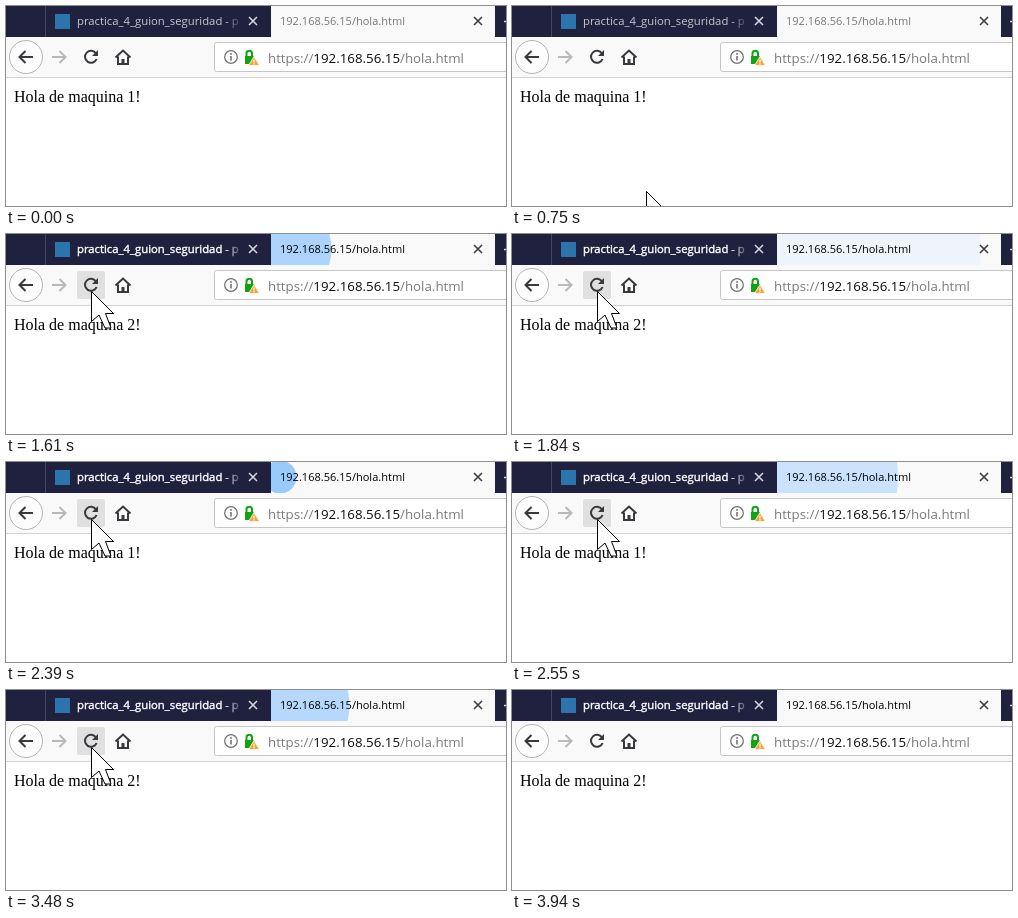
These frames come from a looping animation (500x200 px, 4800 ms). An HTML page:

```html
<!DOCTYPE html>
<html lang="es">
<head>
<meta charset="utf-8">
<title>Recarga de página</title>
<style>
  html, body { margin: 0; width: 100%; height: 100%; overflow: hidden; background: #fff; }
  svg { display: block; width: 500px; height: 200px; }
  text { font-family: "Open Sans", "Noto Sans", sans-serif; white-space: pre; }
  .page { font: 16px "Liberation Serif", "Times New Roman", serif; }
  .icon { fill: none; stroke: #38383d; stroke-width: 2; }
</style>
</head>
<body>
<svg viewBox="0 0 500 200">
  <defs>
    <linearGradient id="fade">
      <stop offset="0" stop-color="#20213f" stop-opacity="0"/>
      <stop offset="1" stop-color="#20213f"/>
    </linearGradient>
    <clipPath id="tab"><path d="M265 0H489V31H265Z"/></clipPath>
  </defs>

  <!-- Tab strip -->
  <path fill="#20213f" d="M0 0H500V31H0Z"/>
  <path stroke="#45465f" d="M39.5 0V31"/>
  <path fill="#2c74ac" d="M49 8H64V23H49Z"/>
  <text id="otherTitle" x="71" y="19" font-size="11.3" fill="#fff" stroke="#fff">practica_4_guion_seguridad - p</text>
  <path fill="url(#fade)" d="M218 0H238V31H218Z"/>
  <path fill="#20213f" d="M238 0H265V31H238Z"/>
  <path stroke="#d6d6de" stroke-width="1.6" d="M243 11L251 19M251 11L243 19M498 15.5H500"/>
  <path fill="#f9f9fa" d="M265 0H489V31H265Z"/>
  <g clip-path="url(#tab)"><circle id="burst" cx="274" cy="15" fill="#0a84ff"/></g>
  <text id="title" x="274" y="19" font-size="11.04">192.168.56.15/hola.html</text>
  <path stroke="#3c3c40" stroke-width="1.6" d="M468 11L476 19M476 11L468 19"/>

  <!-- Toolbar -->
  <path fill="#f9f9fa" d="M0 31H500V71H0Z"/>
  <path stroke="#d2d2d4" d="M0 71.5H500"/>
  <rect id="button" x="71" y="37" width="28" height="28" rx="2" fill="#0c0c0d"/>
  <circle cx="20" cy="51" r="16.5" fill="#fdfdfd" stroke="#b4b4b6"/>
  <path class="icon" d="M27 51H14M19.5 45L13.5 51L19.5 57"/>
  <path class="icon" style="stroke:#b9b9bb" d="M46 51H59M53.5 45L59.5 51L53.5 57"/>
  <path class="icon" d="M90 47.5A6 6 0 1 0 90.6 53"/>
  <path fill="#38383d" d="M92 44V50H86Z"/>
  <path class="icon" d="M109.5 51.5L117 44.5L124.5 51.5M112 50.5V58H122V50.5"/>
  <path fill="#38383d" d="M115.5 53H118.5V58H115.5Z"/>

  <!-- Address bar -->
  <rect x="208.5" y="36.5" width="310" height="29" rx="2" fill="#fff" stroke="#c6c6c8"/>
  <circle cx="225" cy="51" r="6.3" fill="none" stroke="#737376" stroke-width="1.3"/>
  <path stroke="#737376" stroke-width="1.6" d="M225 50V54.5M225 47V48.7"/>
  <path fill="none" stroke="#12a312" stroke-width="2" d="M240.5 51V47.5A2.7 2.7 0 0 1 246 47.5V51"/>
  <path fill="#12a312" d="M239 50H248V58H239Z"/>
  <path fill="#f9a53f" stroke="#fff" stroke-width=".8" d="M248 50.5L253.5 59.5H242.5Z"/>
  <path stroke="#fff" stroke-width="1.2" d="M248 53.5V56.5M248 57.3V58.5"/>
  <text x="262" y="57" font-size="13.3" fill="#7b7b7e">https://<tspan fill="#0c0c0d">192.168.56.15</tspan>/hola.html</text>

  <text id="greeting" class="page" x="8" y="96"></text>
  <path id="cursor" fill="#fff" stroke="#000"
        d="M.5 .5V30.5L8 24L14 37H20L14.5 22.5H22.5Z"/>
</svg>
<script>
const LOOP = 4800, TICK = 77.8, GLIDE = 5 * TICK, BURST = 375;
const ENTER = 750, CLICK = 1450, LEAVE = ENTER + 35 * TICK;
const loads = [1530, 2365, 3368];
const $ = id => document.getElementById(id);

// Eased progress of one pointer glide
function glide(t, start) {
  const k = Math.min(1, Math.max(0, (t - start) / GLIDE));
  return 1 - (1 - k) ** 1.3;
}

function draw(now) {
  const time = now % LOOP;
  const t = ENTER + Math.floor((time - ENTER) / TICK) * TICK;

  const before = 1 - glide(t, ENTER), after = glide(t, LEAVE);
  const x = Math.round(85 + 49 * before + 193 * after);
  const y = Math.round(57 + 128 * before + 133 * after);
  $("cursor").setAttribute("transform", `translate(${x} ${y})`);
  $("cursor").style.display = before < 1 || t === ENTER ? "" : "none";
  if (t > LEAVE + GLIDE + TICK / 2) $("cursor").style.display = "none";
  $("button").style.opacity = Math.abs(x - 85) < 14 && Math.abs(y - 51) < 14 ? 0.1 : 0;

  const focused = t >= CLICK;
  $("otherTitle").style.opacity = focused ? 1 : 0.75;
  $("otherTitle").style.strokeWidth = focused ? 0.4 : 0;
  $("title").style.fill = focused ? "#000" : "#77777a";

  // Each finished load sends a fading burst across the tab.
  const done = loads.filter(start => start <= t);
  const p = Math.min(1, (t - (done.at(-1) ?? -BURST)) / BURST);
  const left = done.length ? 1 - p : 0;
  $("burst").setAttribute("r", 235 - 230 * left);
  $("burst").style.opacity = 0.43 * left ** 1.3;
  $("greeting").textContent = `Hola de maquina ${1 + done.length % 2}!`;
}

function frame() {
  draw(performance.now());
  requestAnimationFrame(frame);
}
frame();
</script>
</body>
</html>
```
